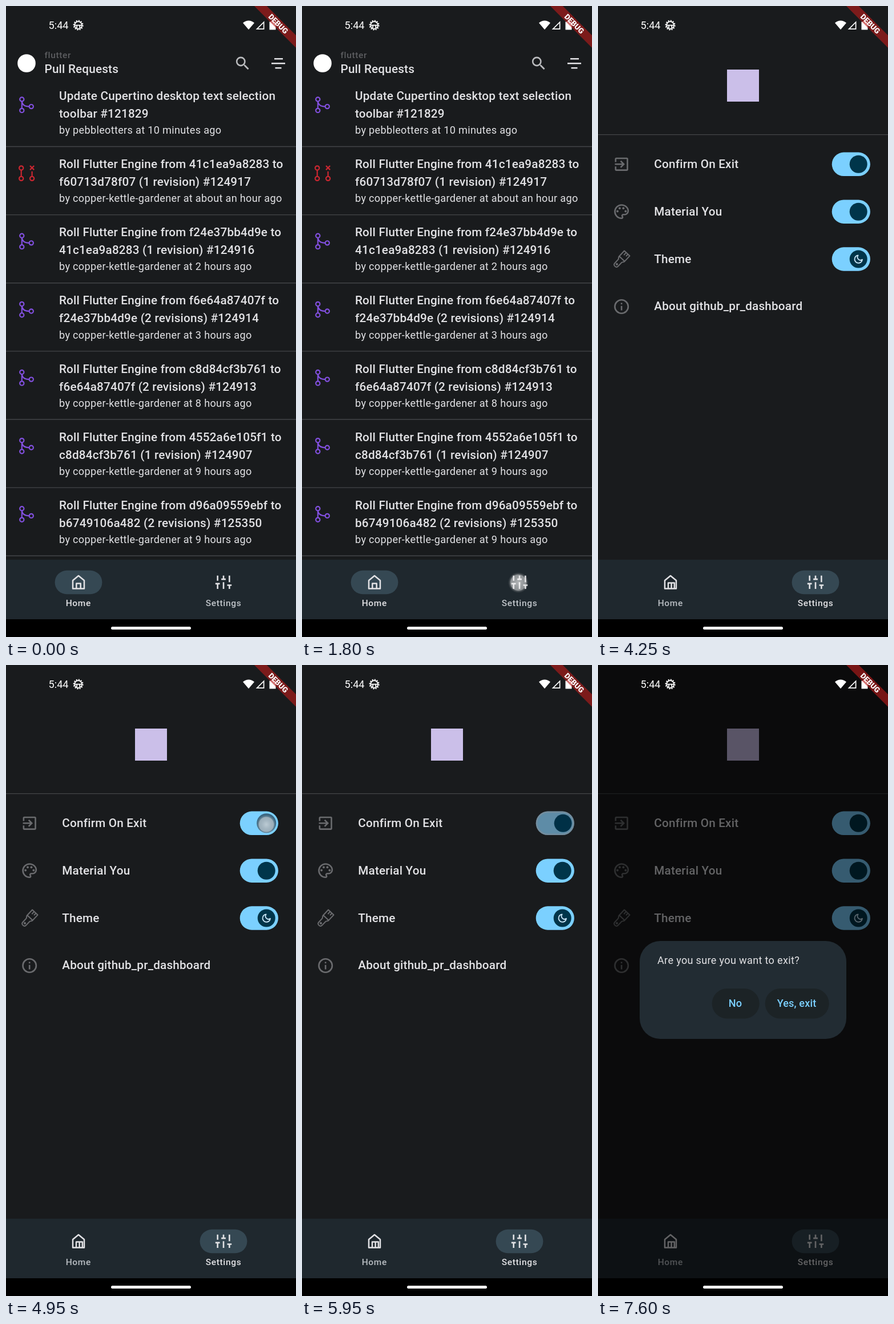
These frames come from a looping animation (508x1102 px, 8 s). An HTML page:

```html
<!DOCTYPE html>
<html lang="en">
<head>
<meta charset="utf-8">
<title>Pull request dashboard</title>
<style>
html, body { margin: 0; width: 100%; height: 100%; overflow: hidden; background: #191b1d; }
svg { display: block; width: 508px; height: 1102px; }
text { font-family: Roboto, sans-serif; fill: #e2e2e5; }
.title { font-size: 20.7px; font-weight: 500; letter-spacing: .19px; }
.body { font-size: 18.1px; letter-spacing: .32px; }
.org { font-size: 15.5px; font-weight: 500; letter-spacing: .62px; fill: #5c5d60; }
.label { font-size: 15.5px; font-weight: 500; letter-spacing: .65px; text-anchor: middle; }
.action { font-size: 18.1px; font-weight: 500; letter-spacing: .13px; text-anchor: middle; fill: #7bd0ff; }
.line { fill: none; stroke: #e2e2e5; stroke-width: 2.5; }
.rule { stroke: #434548; stroke-width: 1.4; }
.merged { fill: none; stroke: #8250df; stroke-width: 2.2; }
.closed { fill: none; stroke: #cb2731; stroke-width: 2.2; }
.tile { fill: #6a6b6e; }
.track { fill: #7bd0ff; }
.thumb { fill: #00354a; }
.pill { fill: #354853; transform-box: fill-box; transform-origin: center; }

.before, .after, .old, .new, .tabOn, .tabOff, .tap, #dialog, #track, #rim, #thumb {
  animation: 8s linear infinite;
}
.before { animation-name: before; }
.after { animation-name: after; }
.old { animation-name: old; }
.new { animation-name: grow; }
.tabOn { animation-name: tabOn; }
.tabOff { animation-name: tabOff; }
.tap { opacity: 0; }
#tapTab { animation-name: tapTab; }
#tapSwitch { animation-name: tapSwitch; }
#dialog { animation-name: dialog; }
#track { animation-name: track; }
#rim { animation-name: rim; }
#thumb { animation-name: thumb; }

/* 1% = 80 ms */
@keyframes before { 0%, 23.12% { visibility: visible } 23.125%, 100% { visibility: hidden } }
@keyframes after { 0%, 23.12% { visibility: hidden } 23.125%, 100% { visibility: visible } }
@keyframes old { 0%, 23.125% { opacity: 1 } 24.375%, 100% { opacity: 0 } }
@keyframes grow {
  0%, 23.12% { transform: scaleX(0); opacity: 0 }
  23.125% { transform: scaleX(0); opacity: 0; animation-timing-function: cubic-bezier(.3, .3, .1, 1) }
  28.125%, 100% { transform: scaleX(1); opacity: 1 }
}
@keyframes tabOn { 0%, 23.125% { fill: #c0c5ca } 25%, 100% { fill: #e2e2e5 } }
@keyframes tabOff { 0%, 23.125% { fill: #e2e2e5 } 25%, 100% { fill: #b9bec3 } }
@keyframes tapTab {
  0%, 21.87% { opacity: 0 } 21.875%, 23.125% { opacity: 1 } 23.75%, 100% { opacity: 0 }
}
@keyframes tapSwitch {
  0%, 60.62% { opacity: 0 } 60.625%, 62.5% { opacity: 1 } 63.1%, 71.24% { opacity: 0 }
  71.25%, 72.5% { opacity: 1 } 73.1%, 100% { opacity: 0 }
}
@keyframes track {
  0%, 62.5% { fill: #7bd0ff } 66.25%, 72.5% { fill: #41484d } 76.25%, 100% { fill: #7bd0ff }
}
@keyframes rim {
  0%, 62.5% { opacity: 0 } 66.25%, 72.5% { opacity: 1 } 76.25%, 100% { opacity: 0 }
}
@keyframes thumb {
  0%, 60.625% { transform: none; r: 15.5px; fill: #00354a }
  61.875% { transform: none; r: 17px; fill: #3b6680 }
  62.5% { transform: none; r: 18px; fill: #2a566f; animation-timing-function: cubic-bezier(.175, .885, .32, 1.2) }
  66.25%, 71.25% { transform: translateX(-25.9px); r: 10.4px; fill: #8a9096 }
  72.5% { transform: translateX(-25.9px); r: 17px; fill: #b4bcc2; animation-timing-function: cubic-bezier(.175, .885, .32, 1.2) }
  76.25%, 100% { transform: none; r: 15.5px; fill: #00354a }
}
@keyframes dialog {
  0%, 86.2% { opacity: 0 } 86.25%, 86.87% { opacity: .012 } 86.875%, 88.1% { opacity: .03 }
  88.125% { opacity: .35; animation-timing-function: ease-out }
  90%, 100% { opacity: 1 }
}
</style>
</head>
<body>
<svg viewBox="0 0 508 1102">
  <defs>
    <radialGradient id="dot">
      <stop offset="0" stop-color="#fff" stop-opacity=".66"/>
      <stop offset=".45" stop-color="#f0f0f0" stop-opacity=".58"/>
      <stop offset=".74" stop-color="#e8e8e8" stop-opacity=".56"/>
      <stop offset=".84" stop-color="#ccc" stop-opacity=".22"/>
      <stop offset="1" stop-color="#ccc" stop-opacity="0"/>
    </radialGradient>
    <g id="merged" class="merged">
      <circle cx="27.8" cy="163" r="3.6"/><circle cx="27.8" cy="182.4" r="3.6"/><circle cx="44.3" cy="175.6" r="3.6"/>
      <path d="M27.8 166.6V178.8M27.8 166.6C28.5 172 33 175.6 40.7 175.6"/>
    </g>
    <g id="closed" class="closed">
      <circle cx="26.7" cy="163.8" r="3.6"/><circle cx="26.7" cy="182.2" r="3.6"/><circle cx="45.6" cy="182.2" r="3.6"/>
      <path d="M26.7 167.4V178.6M45.6 169.6V178.6M42 159.8l7.2 7.2M49.2 159.8l-7.2 7.2"/>
    </g>
    <path id="sliders" d="M4 21v-7M4 10V3M12 21v-9M12 8V3M20 21v-5M20 12V3M1 14h6M9 8h6M17 16h6"/>
  </defs>
  <rect width="508" height="1102" fill="#191b1d"/>

  <g class="before">
    <circle cx="36" cy="100" r="15.8" fill="#fff"/>
    <text class="org" x="67.5" y="90.5">flutter</text>
    <text class="title" x="67.5" y="117">Pull Requests</text>
    <path transform="translate(399 84.7) scale(1.293)" fill="#babbbe" d="M15.5 14h-.79l-.28-.27A6.47 6.47 0 0 0 16 9.5 6.5 6.5 0 1 0 9.5 16c1.61 0 3.09-.59 4.23-1.57l.27.28v.79l5 4.99L20.49 19zm-6 0a4.5 4.5 0 1 1 0-9 4.5 4.5 0 0 1 0 9z"/>
    <path class="line" d="M470 92.3h15M465 100.3h24M471.5 108.3h11"/>
    <g id="list"></g>
  </g>

  <g class="after">
    <rect x="226" y="111" width="56" height="56" fill="#cbbfe9"/>
    <path class="rule" d="M0 224.6H508"/>
    <g class="tile">
      <path transform="translate(25.7 260.8) scale(1.293)" d="M10.09 15.59 11.5 17l5-5-5-5-1.41 1.41L12.67 11H3v2h9.67zM19 3H5a2 2 0 0 0-2 2v4h2V5h14v14H5v-4H3v4a2 2 0 0 0 2 2h14a2 2 0 0 0 2-2V5a2 2 0 0 0-2-2z"/>
      <g transform="translate(25.7 343.6) scale(1.293)">
        <path d="M12 22a10 10 0 0 1 0-20c5.51 0 10 4.04 10 9a6 6 0 0 1-6 6h-1.77a.5.5 0 0 0-.37.83A2.5 2.5 0 0 1 12 22zm0-18a8 8 0 0 0 0 16 .5.5 0 0 0 .36-.85A2.5 2.5 0 0 1 14.23 15H16a4 4 0 0 0 4-4c0-3.86-3.59-7-8-7z"/>
        <circle cx="6.5" cy="11.5" r="1.5"/><circle cx="9.5" cy="7.5" r="1.5"/><circle cx="14.5" cy="7.5" r="1.5"/><circle cx="17.5" cy="11.5" r="1.5"/>
      </g>
      <g transform="translate(41.3 442.2) rotate(43)" fill="none" stroke="#6a6b6e" stroke-width="2" stroke-linejoin="round">
        <path d="M-6.5-14H6.5V0L4 4V13Q4 17 0 17T-4 13V4L-6.5 0ZM-6.5-1H6.5M-2-14V-8M2.2-14V-9"/>
        <circle cy="12" r="1"/>
      </g>
      <g transform="translate(41.2 525)">
        <circle r="11.7" fill="none" stroke="#6a6b6e" stroke-width="2.6"/>
        <path d="M-1.3-6.5h2.6v2.6h-2.6zM-1.3-1.3h2.6v7.8h-2.6z"/>
      </g>
    </g>
    <g id="options"></g>
    <rect id="track" class="track" x="409.7" y="255.6" width="67.2" height="41.4" rx="20.7"/>
    <rect id="rim" x="411" y="256.9" width="64.6" height="38.8" rx="19.4" fill="none" stroke="#8a9096" stroke-width="2.6"/>
    <circle id="thumb" class="thumb" cx="456.2" cy="276.3" r="15.5"/>
    <rect class="track" x="409.7" y="338.5" width="67.2" height="41.4" rx="20.7"/>
    <circle class="thumb" cx="456.2" cy="359.2" r="15.5"/>
    <rect class="track" x="409.7" y="421.3" width="67.2" height="41.4" rx="20.7"/>
    <circle class="thumb" cx="456.2" cy="442" r="15.5"/>
    <path transform="translate(447.2 433.2) scale(.75)" fill="none" stroke="#cbe6f8" stroke-width="2.4" stroke-linejoin="round" d="M21 12.79A9 9 0 1 1 11.21 3 7 7 0 0 0 21 12.79z"/>
  </g>

  <g id="nav">
    <rect y="967" width="508" height="104" fill="#1f282e"/>
    <rect class="pill old" x="85.6" y="985.8" width="82.8" height="41.4" rx="20.7"/>
    <rect class="pill new" x="339.6" y="985.8" width="82.8" height="41.4" rx="20.7"/>
    <g class="line" stroke-linejoin="round">
      <path d="M117 1003.2 127 995l10 8.2V1017.6H117Z"/>
      <path class="before" d="M123.3 1017.6V1008.5H130.7V1017.6"/>
      <path class="after" d="M123 1017.6V1007.5H133.8V1017.6M128.6 1008V1017.6"/>
      <use href="#sliders" transform="translate(365.5 990.8) scale(1.293)" stroke-width="2"/>
    </g>
    <text class="label tabOff" x="126.8" y="1047.6">Home</text>
    <text class="label tabOn" x="381" y="1047.6">Settings</text>
  </g>

  <g id="dialog">
    <rect width="508" height="1071" fill="#000" opacity=".56"/>
    <rect x="73" y="482" width="362" height="171" rx="36" fill="#222c33"/>
    <text class="body" x="104" y="522">Are you sure you want to exit?</text>
    <rect x="199.7" y="565" width="83" height="52.5" rx="26.2" fill="#1c2326"/>
    <rect x="292.7" y="565" width="112" height="52.5" rx="26.2" fill="#1c2326"/>
    <text class="action" x="240.5" y="597">No</text>
    <text class="action" x="348" y="597">Yes, exit</text>
  </g>

  <rect y="1071" width="508" height="31" fill="#000"/>
  <rect x="184" y="1084" width="140" height="5" rx="2.5" fill="#fff"/>

  <g id="status" fill="#fff">
    <text x="74.6" y="40.4" font-size="18.1" style="fill:#fff">5:44</text>
    <g transform="translate(126.6 33.6)" fill="none" stroke="#fff">
      <circle r="6.4" stroke-width="1.8"/>
      <circle r="8" stroke-width="2" stroke-dasharray="2.1 2.09"/>
      <path stroke-width="1.7" d="M-6 0H6M-2.5 0V5M2.5 0V5"/>
    </g>
    <path d="M415 29.6Q425 21.6 435 29.6L425 41.2Z"/>
    <path fill="none" stroke="#fff" stroke-width="1.7" d="M439.6 40.2H451.6V28.2Z"/>
    <path d="M461.5 27.5H464.5V25.5H469.5V27.5H472.5V41.5H461.5Z"/>
  </g>
  <g transform="translate(508 0) rotate(45)">
    <rect x="-51.7" y="36.2" width="103.4" height="15.5" fill="#b71c1c" fill-opacity=".627"/>
    <text y="48.6" text-anchor="middle" font-size="13.2" font-weight="900" style="fill:#fff">DEBUG</text>
  </g>

  <circle class="tap" id="tapTab" cx="379" cy="1007" r="18" fill="url(#dot)"/>
  <circle class="tap" id="tapSwitch" cx="456" cy="278.5" r="17" fill="url(#dot)"/>
</svg>
<script>
const BOT = 'copper-kettle-gardener';
const PITCH = 119.13;

const roll = (from, to, note, id, age) =>
  [`Roll Flutter Engine from ${from} to`, `${to} (${note}) #${id}`, BOT, age];

const pulls = [
  ['Update Cupertino desktop text selection', 'toolbar #121829', 'pebbleotters', '10 minutes'],
  roll('41c1ea9a8283', 'f60713d78f07', '1 revision', 124917, 'about an hour'),
  roll('f24e37bb4d9e', '41c1ea9a8283', '1 revision', 124916, '2 hours'),
  roll('f6e64a87407f', 'f24e37bb4d9e', '2 revisions', 124914, '3 hours'),
  roll('c8d84cf3b761', 'f6e64a87407f', '2 revisions', 124913, '8 hours'),
  roll('4552a6e105f1', 'c8d84cf3b761', '1 revision', 124907, '9 hours'),
  roll('d96a09559ebf', 'b6749106a482', '2 revisions', 125350, '9 hours'),
];

const text = (kind, x, y, words) => `<text class="${kind}" x="${x}" y="${y}">${words}</text>`;

document.getElementById('list').innerHTML = pulls.map(([first, second, author, age], i) =>
  `<g transform="translate(0 ${i * PITCH})">
    <use href="#${i === 1 ? 'closed' : 'merged'}"/>
    ${text('title', 93, 164, first)}${text('title', 93, 195, second)}
    ${text('body', 93, 223.2, `by ${author} at ${age} ago`)}
    <path class="rule" d="M0 245.5H508"/>
  </g>`).join('');

document.getElementById('options').innerHTML =
  ['Confirm On Exit', 'Material You', 'Theme', 'About github_pr_dashboard']
    .map((name, i) => text('title', 98.3, 283 + i * 82.8, name)).join('');
</script>
</body>
</html>
```
